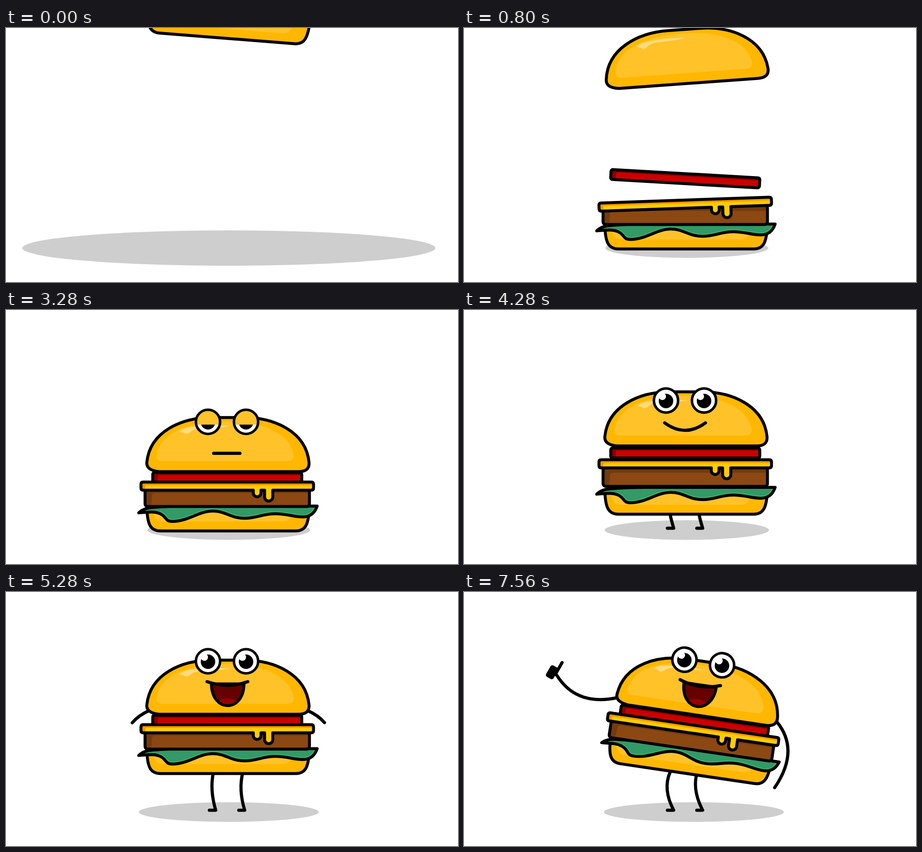
Write an HTML page that moves like this. It is 998 px wide and 561 px high and loops after 8.64 s.

```html
<!DOCTYPE html>
<html lang="en">
<head>
<meta charset="utf-8">
<title>Burger</title>
<style>
  html, body { margin: 0; width: 100%; height: 100%; overflow: hidden; background: #fff; }
  svg { display: block; width: 100%; height: 100%; }
  .ink { stroke: #000; stroke-width: 6.5; stroke-linejoin: round; stroke-linecap: round; }
  .line { fill: none; }
  .bold { stroke-width: 7; }
</style>
</head>
<body>
<svg viewBox="0 0 998 561">
  <defs>
    <path id="leaf" d="M293 448Q304 437 325 436Q360 433 400 433H687Q679 457 655 457C635 457 620 450 595 450C565 450 555 460 527 460C495 460 485 444 457 444C425 444 403 467 367 467C350 467 355 455 338 449C325 444 312 447 293 448Z"/>
    <path id="grin" d="M452 290C453 354 523 354 524 290Z"/>
    <clipPath id="leafClip"><use href="#leaf"/></clipPath>
    <clipPath id="grinClip"><use href="#grin"/></clipPath>
    <clipPath id="reveal"><rect id="revealBox" x="430" y="285" width="120"/></clipPath>
    <clipPath id="eyeClip"><circle r="26.7"/></clipPath>
  </defs>

  <ellipse id="shadow" cy="486" fill="#cecece"/>
  <g id="legs" class="ink line bold"><path id="legL"/><path id="legR"/></g>
  <g id="arms" class="ink line bold">
    <path id="armL" pathLength="1"/><path id="armR" pathLength="1"/>
    <g id="hand"><rect x="-22" y="-15" width="19" height="29" rx="5" fill="#000" stroke="none"/><path d="M-4 0V-30"/></g>
  </g>

  <g id="body">
    <g class="layer">
      <path fill="#ffb700" d="M311 436C312 474 319 488 341 488H640C661 488 668 474 670 436Z"/>
      <path fill="#ffc229" d="M323 436Q326 467 345 467H612Q632 467 634 436Z"/>
      <path class="ink line" d="M311 436C312 474 319 488 341 488H640C661 488 668 474 670 436Z"/>
    </g>
    <g class="layer">
      <use href="#leaf" fill="#339966"/>
      <path clip-path="url(#leafClip)" fill="none" stroke="#2eb873" stroke-width="11" d="M687 433Q679 457 655 457C635 457 620 450 595 450C565 450 555 460 527 460C495 460 485 444 457 444C425 444 403 467 367 467C350 467 355 455 338 449"/>
      <use href="#leaf" class="ink line"/>
    </g>
    <g class="layer">
      <rect x="307" y="391" width="363" height="43" rx="6" fill="#733a0e"/>
      <path fill="#8b4812" d="M319 434Q322 428 322 412Q322 404 330 404H670V434Z"/>
      <rect class="ink line" x="307" y="391" width="363" height="43" rx="6"/>
    </g>
    <g class="layer">
      <rect x="324" y="359" width="329" height="22" rx="4" fill="#8f0000"/>
      <path fill="#c00" d="M335 381V370Q335 365 340 365H653V381Z"/>
      <rect class="ink line" x="324" y="359" width="329" height="22" rx="4"/>
    </g>
    <g class="layer">
      <rect x="298" y="380" width="381" height="18" rx="5" fill="#ff9500"/>
      <path fill="#fc0" d="M307 398V391Q307 387 311 387H679V398H589V413a9 9 0 0 1-18 0V398H563V404a8.5 8.5 0 0 1-17 0V398Z"/>
      <path class="ink line" d="M303 380H674q5 0 5 5v8q0 5-5 5H589V413a9 9 0 0 1-18 0V398H563V404a8.5 8.5 0 0 1-17 0V398H303q-5 0-5-5v-8q0-5 5-5Z"/>
    </g>
    <g class="layer">
      <path class="ink" fill="#ffb700" d="M338 357Q309 354 311 336C318 268 388 237.5 455 237.5H525C592 237.5 662 268 669 336Q671 357 646 357Z"/>
      <path fill="#ffc229" d="M345 334Q330 334 333 318C341 275 395 246 486 246C575 246 625 275 635 318Q637 334 620 334Z"/>
      <path fill="#ffdb7d" d="M383 269Q388 262 405 259Q440 253 494 256Q475 260 425 262Q412 264 407 270Q398 276 394 272Q389 269 383 269Z"/>
    </g>
    <g id="mouth">
      <g clip-path="url(#reveal)">
        <use href="#grin" fill="#600"/>
        <ellipse clip-path="url(#grinClip)" cx="488" cy="337" rx="26" ry="15" fill="#900"/>
        <use href="#grin" class="ink line"/>
      </g>
      <path id="lip" class="ink line bold"/>
    </g>
    <g id="eyes"></g>
  </g>
</svg>

<script>
const LOOP = 8640, STEP = 40;
const $ = id => document.getElementById(id);
const set = (el, attrs) => { for (const k in attrs) el.setAttribute(k, attrs[k]); };
const show = (el, on) => el.style.display = on ? '' : 'none';
const clamp = u => Math.min(1, Math.max(0, u));
const mix = (a, b, u) => a + (b - a) * u;
const mixAll = (a, b, u) => a.map((v, i) => mix(v, b[i], u));
const linear = u => u;
const smooth = u => u * u * (3 - 2 * u);
const easeOut = u => 1 - (1 - u) ** 3;

// keys: time, value, time, value, ...
function tween(t, keys, ease = smooth) {
  let v = keys[1];
  for (let i = 2; i < keys.length; i += 2)
    if (t > keys[i - 2]) v = mix(keys[i - 1], keys[i + 1], ease(clamp((t - keys[i - 2]) / (keys[i] - keys[i - 2]))));
  return v;
}
const quad = p => `M${p[0]} ${p[1]}Q${p[2]} ${p[3]} ${p[4]} ${p[5]}`;

$('eyes').innerHTML = `<g>
  <circle r="26.7" fill="#fff"/><circle r="16" cy="1"/><circle cx="-8" cy="-9" r="8" fill="#fff"/>
  <rect class="lid" x="-28" y="-28" width="56" fill="#ffc229" clip-path="url(#eyeClip)"/>
  <circle r="26.7" class="line" stroke="#000" stroke-width="5.6"/></g>`.repeat(2);

const layers = [...document.querySelectorAll('.layer')];
// landing time, tilt direction, centre height, place in the stack
const drops = [[250, 1, 460, 0], [400, -1, 448, .21], [540, 1, 413, .37], [820, 1, 370, .84], [720, -1, 389, .6], [926, -1, 300, .96]];
const LID = [1560, 0, 1800, .55, 2320, .55, 2520, 1, 2760, .55, 3220, .55, 3480, 1, 3720, 0,
  6480, 0, 6640, 1, 6800, 0, 7200, 0, 7380, 1, 7560, 0];

function draw(t) {
  const rise = tween(t, [4160, 0, 4440, -94, 4920, -87]);
  const spread = tween(t, [4160, 0, 4440, 52, 4920, 0]);
  const jump = tween(t, [4160, 0, 4440, 1]);
  const lean = tween(t, [5860, 0, 6260, 1], easeOut);

  set($('shadow'), {
    cx: tween(t, [5860, 492, 6320, 507.5], linear),
    rx: t < 1000 ? tween(t, [0, 456, 250, 180], linear) : tween(t, [4160, 180, 4880, 198.5]),
    ry: tween(t, [0, 39, 250, 21.7], linear)
  });
  set($('body'), { transform: `translate(${3 * lean} ${rise}) rotate(${8.4 * lean} 489 488)` });

  layers.forEach((layer, i) => {
    const [land, side, cy, place] = drops[i];
    const y = Math.min(0, t - land) * 1.86 - spread * place;
    const u = clamp((t - land + 250) / 440);
    set(layer, { transform: `translate(0 ${y}) rotate(${side * 4.5 * (1 - u * u)} 489 ${cy})` });
  });

  // eyes
  const lid = 3 + 51 * tween(t, LID);
  [...$('eyes').children].forEach((eye, i) => {
    const start = 1160 + 40 * i;
    const size = tween(t, [start, 0, start + 200, 1.26, start + 400, 1]);
    show(eye, size > 0);
    set(eye, { transform: `translate(${446 + 84 * i + lean} ${247 - 7 * jump - spread * .36}) scale(${size})` });
    set(eye.querySelector('.lid'), { height: lid });
  });

  // mouth
  const grow = tween(t, [1250, 0, 1520, 1]);
  const smile = tween(t, [3600, 0, 4000, 1]);
  const half = mix(29 * grow, 45, smile);
  const lipY = 316.5 - 12.5 * smile - 19 * jump;
  const bend = 44 * smile - 28 * jump;
  show($('mouth'), grow > 0);
  set($('mouth'), { transform: `translate(${1.5 * jump} ${-spread * .5})` });
  set($('lip'), { d: quad([487.5 - half, lipY, 487.5, lipY + bend, 487.5 + half, lipY]) });
  set($('revealBox'), { height: tween(t, [4400, 0, 4740, 59]) });

  // legs
  show($('legs'), t >= 4160);
  const hip = 485 + rise;
  set($('legL'), { d: quad([458 - 3 * lean, hip, 449.5 - 11 * lean, 436, 463, 482]) + 'H449' });
  set($('legR'), { d: quad([523 - 8 * lean, hip, 513 - 10 * lean, 436, 527, 482]) + 'H514' });

  // arms
  const reach = tween(t, [5000, 0, 5720, 1]);
  const wave = tween(t, [5920, 0, 6320, 1], easeOut);
  const left = mixAll([316, 262, 252, 290, 252, 374], [340, 233, 248.5, 253.5, 205, 184], wave);
  const right = mixAll([666, 262, 731, 290, 728, 374], [691, 287, 742, 350, 686, 432], wave);
  const dash = { 'stroke-dasharray': reach < 1 ? `${reach} 2` : 'none' };
  show($('arms'), reach > 0);
  set($('armL'), { d: quad(left), ...dash });
  set($('armR'), { d: quad(right), ...dash });
  const fist = tween(t, [5880, 0, 6320, 1]);
  show($('hand'), fist > 0);
  set($('hand'), { transform: `translate(${left[4]} ${left[5]}) rotate(${30 * fist}) scale(${fist})` });
}

const begin = performance.now();
function frame() {
  const t = (performance.now() - begin) % LOOP;
  draw(Math.floor(t / STEP) * STEP);
  requestAnimationFrame(frame);
}
frame();
</script>
</body>
</html>
```
